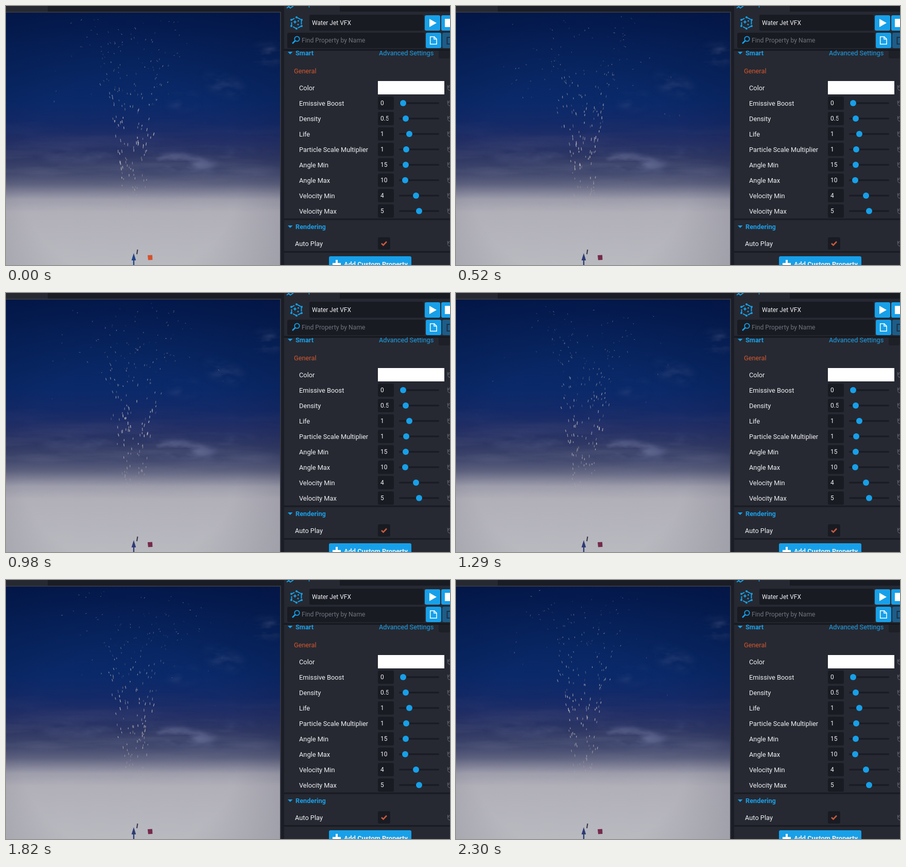
Recreate the animation shown at these times as an HTML page with a canvas. Size 862 px wide and 504 px high, loop 2.37 s.

```html
<!DOCTYPE html>
<html lang="en">
<head>
<meta charset="utf-8">
<title>Water Jet VFX</title>
<style>
  html, body { margin: 0; width: 862px; height: 504px; overflow: hidden; background: #1b1d26; }
  svg, canvas { position: absolute; left: 0; top: 0; display: block; }
  text { font: 12.8px Roboto, "Open Sans", sans-serif; fill: #f1f2f4; }
  .in { font-size: 12px; }
  .find { font-size: 12.2px; fill: #70737c; }
  .b { font-weight: 700; }
  .link { fill: #1c9fe6; }
  .dark { fill: #191b23; }
  .blue { fill: #17a0e9; }
  .ico { fill: none; stroke: #17a0e9; stroke-width: 2; }
  /* the corner markers are brighter during the first picture of the loop */
  #cube { animation: cube 2370ms step-end infinite; }
  #cone { animation: cone 2370ms step-end infinite; }
  @keyframes cube { 0% { fill: #d4512b; } 2.954% { fill: #742a4b; } }
  @keyframes cone { 0% { fill: #1d4487; } 2.954% { fill: #2d3b74; } }
</style>
</head>
<body>
<svg width="862" height="504" viewBox="0 0 862 504">
  <defs>
    <linearGradient id="sky" gradientUnits="userSpaceOnUse" x1="0" y1="13" x2="0" y2="504">
      <stop offset="0" stop-color="#041b52"/>
      <stop offset=".18" stop-color="#07245f"/>
      <stop offset=".35" stop-color="#0a2969"/>
      <stop offset=".44" stop-color="#142a68"/>
      <stop offset=".51" stop-color="#232f66"/>
      <stop offset=".58" stop-color="#303964"/>
      <stop offset=".64" stop-color="#444b70"/>
      <stop offset=".68" stop-color="#5e627f"/>
      <stop offset=".71" stop-color="#7f8096"/>
      <stop offset=".74" stop-color="#9e9eac"/>
      <stop offset=".79" stop-color="#b1b0b9"/>
      <stop offset="1" stop-color="#b9b9c0"/>
    </linearGradient>
    <radialGradient id="edge" cx=".45" cy=".65" r=".8">
      <stop offset=".5" stop-color="#00041c" stop-opacity="0"/>
      <stop offset="1" stop-color="#00041c" stop-opacity=".22"/>
    </radialGradient>
    <linearGradient id="bandFade" x1="0" y1="0" x2="0" y2="1">
      <stop offset="0" stop-color="#000"/>
      <stop offset=".55" stop-color="#fff"/>
      <stop offset="1" stop-color="#000"/>
    </linearGradient>
    <mask id="band"><rect y="215" width="533" height="185" fill="url(#bandFade)"/></mask>
    <filter id="soft" x="-.5" y="-1" width="2" height="3"><feGaussianBlur stdDeviation="9"/></filter>
    <mask id="puffs">
      <g fill="#fff" filter="url(#soft)">
        <ellipse cx="506" cy="95" rx="34" ry="15" transform="rotate(-15 506 95)"/>
        <ellipse cx="425" cy="155" rx="38" ry="15" transform="rotate(25 425 155)" opacity=".5"/>
        <ellipse cx="342" cy="185" rx="26" ry="14" opacity=".45"/>
        <ellipse cx="338" cy="304" rx="70" ry="15" transform="rotate(6 338 304)"/>
        <ellipse cx="435" cy="288" rx="50" ry="9" opacity=".5"/>
        <ellipse cx="140" cy="290" rx="70" ry="12" opacity=".5"/>
      </g>
    </mask>
    <filter id="streaks" x="0" y="0" width="1" height="1" color-interpolation-filters="sRGB">
      <feTurbulence type="fractalNoise" baseFrequency=".005 .04" numOctaves="4" seed="7"/>
      <feColorMatrix values="0 0 0 0 .48  0 0 0 0 .49  0 0 0 0 .6  0 0 0 2 -.85"/>
    </filter>
    <filter id="wisps" x="0" y="0" width="1" height="1" color-interpolation-filters="sRGB">
      <feTurbulence type="fractalNoise" baseFrequency=".014 .035" numOctaves="4" seed="3"/>
      <feColorMatrix values="0 0 0 0 .47  0 0 0 0 .5  0 0 0 0 .66  0 0 0 3 -1.2"/>
    </filter>
    <clipPath id="view"><rect y="13" width="532" height="491"/></clipPath>
    <clipPath id="half"><rect x="722" y="200" width="20.5" height="40"/></clipPath>
  </defs>

  <rect width="81" height="11" fill="#262932"/>
  <rect y="11" width="534" height="493" fill="#34363f"/>
  <g clip-path="url(#view)">
    <rect y="13" width="532" height="491" fill="url(#sky)"/>
    <g mask="url(#band)"><rect y="215" width="533" height="185" filter="url(#streaks)" opacity=".32"/></g>
    <g mask="url(#puffs)"><rect y="13" width="533" height="340" filter="url(#wisps)" opacity=".6"/></g>
    <rect y="13" width="532" height="491" fill="url(#edge)"/>
    <path d="M255.5 474 L254 483" stroke="#3a3c49" stroke-width="2.2"/>
    <path id="cone" d="M248 481 L252.3 495 H249.2 V504 H246.8 V495 H243.7Z"/>
    <path id="cube" d="M275 485 L284 484.5 L284.5 494 L276 494.5Z"/>
  </g>

  <rect x="540" width="322" height="504" fill="#262932"/>
  <rect x="648" width="214" height="11" class="dark"/>
  <path d="M545 4 L549 1 L552 4 L558 0" class="ico" stroke-width="3"/>
  <path d="M588.5 0 V3" class="ico" style="stroke-width:1.4"/>

  <rect x="840" y="86" width="22" height="16" rx="3" fill="#1e2028"/>
  <rect x="540" y="83" width="322" height="1.5" fill="#1f2129"/>
  <rect x="540" y="84.5" width="322" height="2.5" fill="#15171d"/>

  <rect x="589" y="17" width="222" height="31" rx="3" class="dark"/>
  <text x="594" y="37" class="in">Water Jet VFX</text>
  <path d="M564 22 L573.5 27 V39 L564 44 L554.5 39 V27Z" class="ico" stroke-dasharray="7.5 3.2" stroke-dashoffset="-1.5"/>
  <g class="blue">
    <circle cx="564" cy="22" r="2"/><circle cx="574" cy="27" r="2"/><circle cx="574" cy="39" r="2"/>
    <circle cx="564" cy="44" r="2"/><circle cx="554" cy="39" r="2"/><circle cx="554" cy="27" r="2"/>
    <path d="M561 27 L562.3 30 L565 31 L562.3 32.3 L561 35 L559.7 32.3 L557 31 L559.7 30Z"/>
    <circle cx="567.5" cy="29" r="1.6"/><circle cx="567" cy="36" r="1.6"/>
  </g>
  <rect x="813" y="18" width="30" height="30" rx="3" class="blue"/>
  <path d="M822 25 L836 33 L822 41Z" fill="#fff"/>
  <rect x="845" y="18" width="30" height="30" rx="3" class="blue"/>
  <rect x="852" y="25" width="16" height="16" fill="#fff"/>

  <rect x="546" y="52" width="267" height="30" rx="3" class="dark"/>
  <circle cx="565" cy="64" r="4.7" class="ico" style="stroke-width:1.8"/>
  <path d="M561.5 67.5 L556 73" class="ico" style="stroke-width:2.6"/>
  <text x="574" y="71" class="find">Find Property by Name</text>
  <rect x="815" y="52" width="30" height="30" rx="3" class="blue"/>
  <path d="M823.7 59.7 H831.5 L836 64.2 V74.3 H823.7Z M831 60 V64.5 H836" fill="none" stroke="#fff" stroke-width="1.5"/>
  <rect x="847" y="52" width="30" height="30" rx="3" fill="#1d5d88"/>
  <path d="M862 61 H856.5 V74 H862" fill="none" stroke="#1d2f42" stroke-width="2"/>

  <path d="M547 89 H556.5 L551.7 94Z" class="blue"/>
  <text x="562" y="96" class="b link">Smart</text>
  <text x="724" y="96" class="link">Advanced Settings</text>
  <text x="559" y="131" style="fill:#d4572f">General</text>
  <g id="rows"></g>

  <rect x="540" y="413.5" width="322" height="3" class="dark"/>
  <path d="M547 427 H556.5 L551.7 432Z" class="blue"/>
  <text x="562" y="434" class="b link">Rendering</text>
  <text x="561" y="467">Auto Play</text>
  <rect x="722" y="450" width="24" height="24" rx="3" class="dark"/>
  <path d="M729 462 L732.5 465.5 L739 458.5" fill="none" stroke="#c95a3c" stroke-width="2.6"/>
  <rect x="540" y="477" width="322" height="3" class="dark"/>
  <rect x="627" y="487" width="160" height="30" rx="3" class="blue"/>
  <path d="M642 494 V510 M634 502 H650" stroke="#fff" stroke-width="4"/>
  <text x="656" y="507" class="b">Add Custom Property</text>
</svg>
<canvas id="jet" width="532" height="504"></canvas>

<script>
const LOOP = 2370, FRAMES = 31, STEP = LOOP / FRAMES;

// property rows: label, value, knob position
const props = [
  ['Color'], ['Emissive Boost', '0', 771], ['Density', '0.5', 776], ['Life', '1', 783],
  ['Particle Scale Multiplier', '1', 777], ['Angle Min', '15', 776], ['Angle Max', '10', 775],
  ['Velocity Min', '4', 796], ['Velocity Max', '5', 802]
];
const undo = y => `<path d="M862 ${y - 4} A4.5 4.5 0 0 0 862 ${y + 5} M857.5 ${y - 5} V${y - 1} H861"
  fill="none" stroke="#555861" stroke-width="1.3"/>`;

document.getElementById('rows').innerHTML = props.map(([label, value, knob], i) => {
  const y = 159 + 30 * i;
  const field = value === undefined
    ? `<rect x="722" y="146" width="129" height="26" fill="#fff"/>`
    : `<rect x="722" y="${y - 13}" width="31" height="26" rx="3" class="dark"/>
       <text x="727" y="${y + 4}" class="in" ${value === '0.5' ? 'clip-path="url(#half)"' : ''}>${value}</text>
       <rect x="763" y="${y - 1.5}" width="78" height="3" rx="1.5" class="dark"/>
       <circle cx="${knob}" cy="${y}" r="6" class="blue"/>`;
  return `<text x="569" y="${y + 5}">${label}</text>${field}${undo(y)}`;
}).join('') + undo(462);

// water drops: ballistic flight on the shell of a cone
const RISE = 550, COUNT = 1250;
let seed = 20;
const rnd = () => {
  seed = (seed * 1664525 + 1013904223) >>> 0;
  return seed / 4294967296;
};
const drops = Array.from({ length: COUNT }, (_, i) => ({
  born: (i + rnd()) / COUNT * LOOP,
  side: Math.cos(rnd() * Math.PI * 2) * (0.75 + 0.4 * rnd()),
  peak: 370 + 105 * rnd(),
  life: 0.5 + 1.3 * rnd() ** 2,
  size: 2 + 3 * rnd(),
  turn: (rnd() - 0.5) * 0.8,
  tone: rnd()
}));

const ctx = document.getElementById('jet').getContext('2d');
ctx.lineCap = 'round';

function drawDrop(d, now) {
  const s = (now - d.born + LOOP) % LOOP / RISE;
  if (s > d.life) return;
  const x = 248 + d.side * (9 + 58 * s + 38 * s * s);
  const y = 492 - d.peak * s * (2 - s);
  const angle = Math.atan2(-d.peak * (2 - 2 * s), d.side * (58 + 76 * s)) + d.turn * s;
  // bright and long in the middle of the rise, dull once falling
  const near = Math.max(0, 1 - Math.abs(y - 260) / 170) * Math.max(0, Math.min(1, 2.2 - 2 * s));
  const len = d.size * (0.5 + 0.6 * near) / 2;
  const dx = Math.cos(angle) * len, dy = Math.sin(angle) * len;
  const fade = Math.min(1, (d.life - s) * 4);
  const haze = Math.max(0.08, Math.min(1, (400 - y) / 60));
  const light = 165 + 40 * near + 15 * d.tone;
  ctx.globalAlpha = fade * haze * (0.2 + 0.4 * d.tone + 0.25 * near);
  ctx.strokeStyle = `rgb(${light},${light - 9},${light - 14})`;
  ctx.lineWidth = 1 + 0.4 * near;
  ctx.beginPath();
  ctx.moveTo(x - dx, y - dy);
  ctx.lineTo(x + dx, y + dy);
  ctx.stroke();
}

function draw(now) {
  const frame = Math.min(FRAMES - 1, Math.floor((now % LOOP + 16) / STEP));
  ctx.clearRect(0, 0, 532, 504);
  for (const d of drops) drawDrop(d, frame * STEP);
  requestAnimationFrame(draw);
}
draw(performance.now());
</script>
</body>
</html>
```
